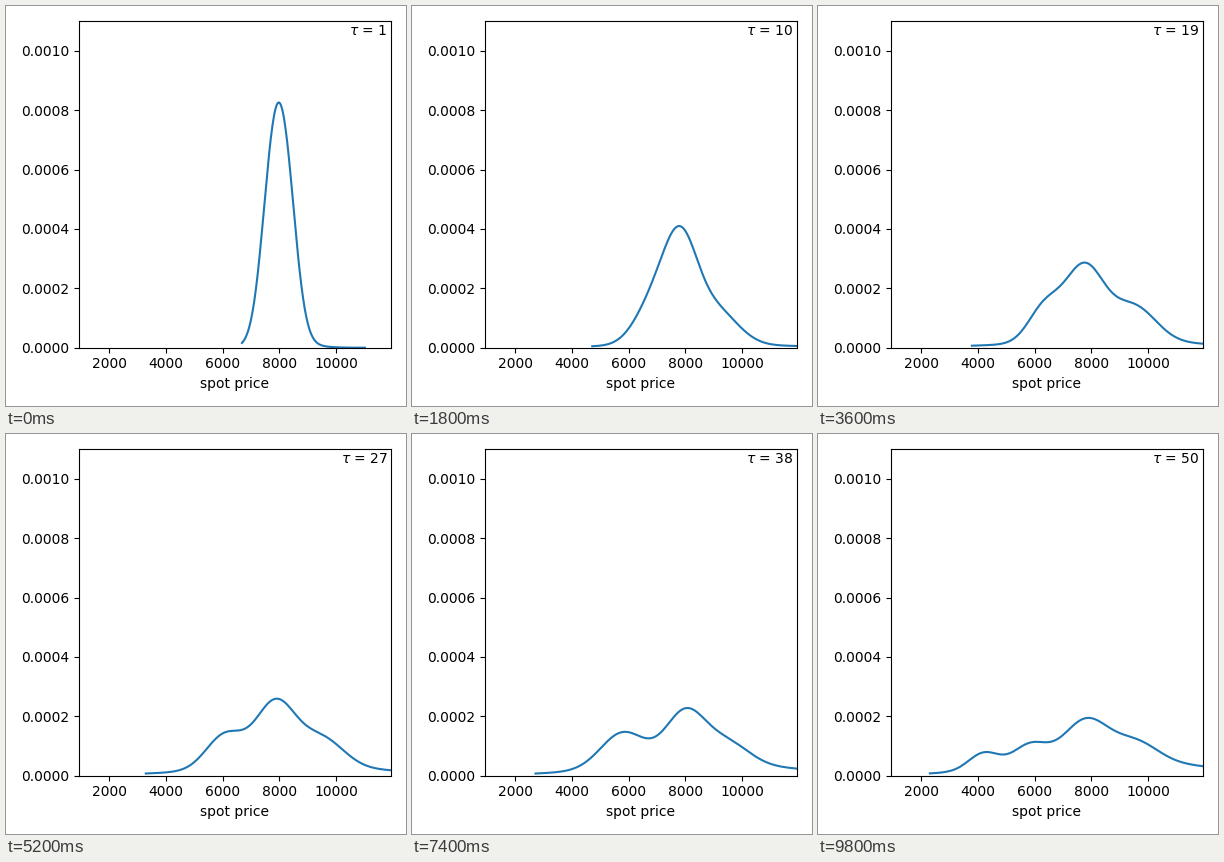
A matplotlib script that plays this animation: 400 px wide and 400 px high, repeating every 10000 ms.

```python
import numpy as np
import matplotlib.pyplot as plt
from matplotlib.animation import FuncAnimation

STEPS = 50
KEY_TAUS = np.array([1, 6, 19, 38, 50])


def glide(tau, values):
    """Value at tau, moving between key values at a diffusion-like pace."""
    return np.interp(np.sqrt(tau), np.sqrt(KEY_TAUS), values)


def bell(x, weight, mean, sd):
    return weight * np.exp(-((x - mean) / sd) ** 2 / 2) / (sd * np.sqrt(2 * np.pi))


def density(tau):
    """Mix of drifting bells with total weight 1; prices in thousands."""
    start = glide(tau, [6.68, 5.27, 3.79, 2.72, 2.31])
    end = min(11.01 + 0.5 * (tau - 1), 13)
    x = np.linspace(start, end, 150)

    left = bell(x, glide(tau, [.48, .255, .157, .235, .106]),
                glide(tau, [7.73, 7.18, 6.33, 5.80, 5.84]),
                glide(tau, [.39, .70, .56, .78, .60]))
    core = bell(x, glide(tau, [.48, .503, .445, .309, .274]),
                glide(tau, [8.22, 7.88, 7.74, 7.99, 7.81]),
                glide(tau, [.39, .53, .70, .70, .78]))
    right = bell(x, glide(tau, [.04, .222, .228, .142, .125]),
                 glide(tau, [8.23, 8.80, 9.50, 9.47, 9.57]), .77)
    spread = bell(x, glide(tau, [0, .02, .17, .314, .419]), 8.7, 3.3)
    low = bell(x, glide(tau, [0, 0, 0, 0, .076]), 4.21, .53)
    return 1000 * x, (left + core + right + spread + low) / 1000


fig, ax = plt.subplots(figsize=(4, 4), dpi=100)
ax.set_xlim(940, 11930)
ax.set_ylim(0, 0.0011)
ax.set_xlabel("spot price")
fig.tight_layout()

line, = ax.plot([], [], color="C0", lw=1.5)
label = ax.text(0.99, 0.99, "", transform=ax.transAxes, ha="right", va="top")


def draw(i):
    tau = i + 1
    line.set_data(*density(tau))
    label.set_text(rf"$\tau$ = {tau}")
    return line, label


anim = FuncAnimation(fig, draw, frames=STEPS, init_func=lambda: draw(0),
                     interval=200, repeat=True, repeat_delay=0)
plt.show()
```
